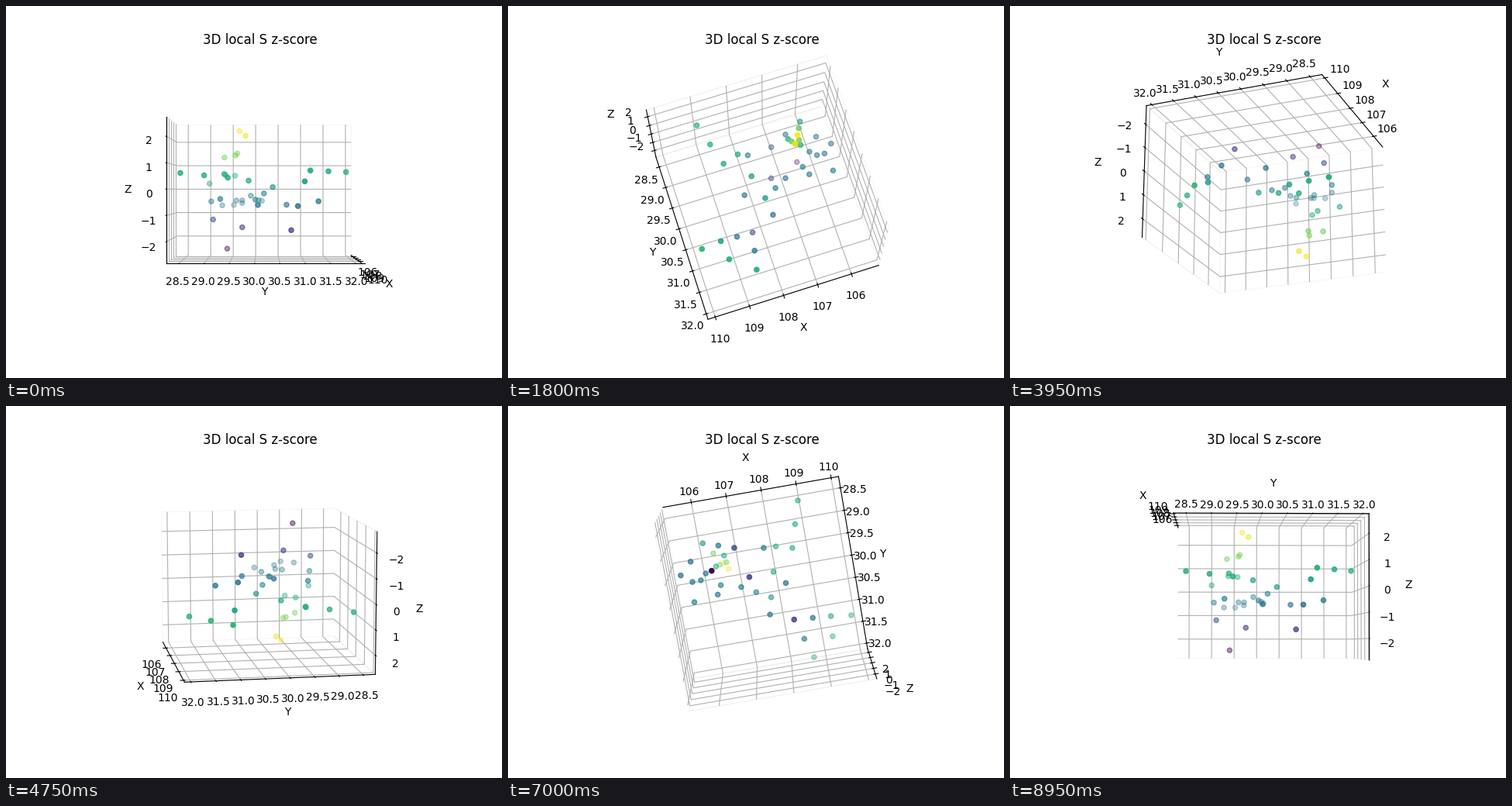
Recreate the animation shown at these times as a matplotlib script. Size 640x480 px, loop 9000 ms.

```python
import numpy as np
import matplotlib.pyplot as plt
from matplotlib.animation import FuncAnimation

FRAMES = 180
STEP = 360 / FRAMES

# Survey lines given by their corners (x, y, z score);
# one more station lies halfway between neighbouring corners.
LINES = [
    [(108.97, 28.48, 0.63), (108.6, 29.44, 0.45), (107.09, 29.1, -1.24),
     (106.22, 29.0, 0.23), (106.6, 29.66, 2.4), (106.45, 29.56, 0.56)],
    [(108.16, 29.36, 0.6), (107.8, 30.37, 0.08), (107.06, 30.0, -0.43),
     (105.74, 30.14, -0.49), (105.85, 29.27, -0.68), (106.52, 29.9, -0.27),
     (105.52, 29.52, -0.67)],
    [(109.88, 31.11, 0.71), (108.67, 31.87, 0.67), (108.33, 30.75, -1.63),
     (109.32, 31.01, 0.3)],
    [(106.72, 29.79, 2.2), (106.72, 29.36, 0.58)],
    [(106.44, 29.39, -2.47), (108.27, 30.06, -0.63)],
    [(107.7, 30.66, -0.63)],
]


def stations(corners):
    pts = np.array(corners)
    return np.vstack([pts, (pts[1:] + pts[:-1]) / 2])


x, y, z = np.vstack([stations(line) for line in LINES]).T

fig = plt.figure(figsize=(6.4, 4.8), dpi=100)
ax = fig.add_subplot(projection="3d")
ax.scatter(x, y, z, c=z, cmap="viridis")
ax.set(title="3D local S z-score", xlabel="X", ylabel="Y", zlabel="Z",
       xlim=(105.19, 110.21), ylim=(28.25, 32.125), zlim=(-2.82, 2.75))
for axis in (ax.xaxis, ax.yaxis, ax.zaxis):
    axis.pane.fill = False


def turn(i):
    # Tilt and spin together; wrapped so the box flips past the poles.
    angle = (i * STEP + 180) % 360 - 180
    ax.view_init(elev=angle, azim=angle)
    return ()


anim = FuncAnimation(fig, turn, frames=FRAMES, interval=50,
                     repeat=True, repeat_delay=0, blit=False)
plt.show()
```
